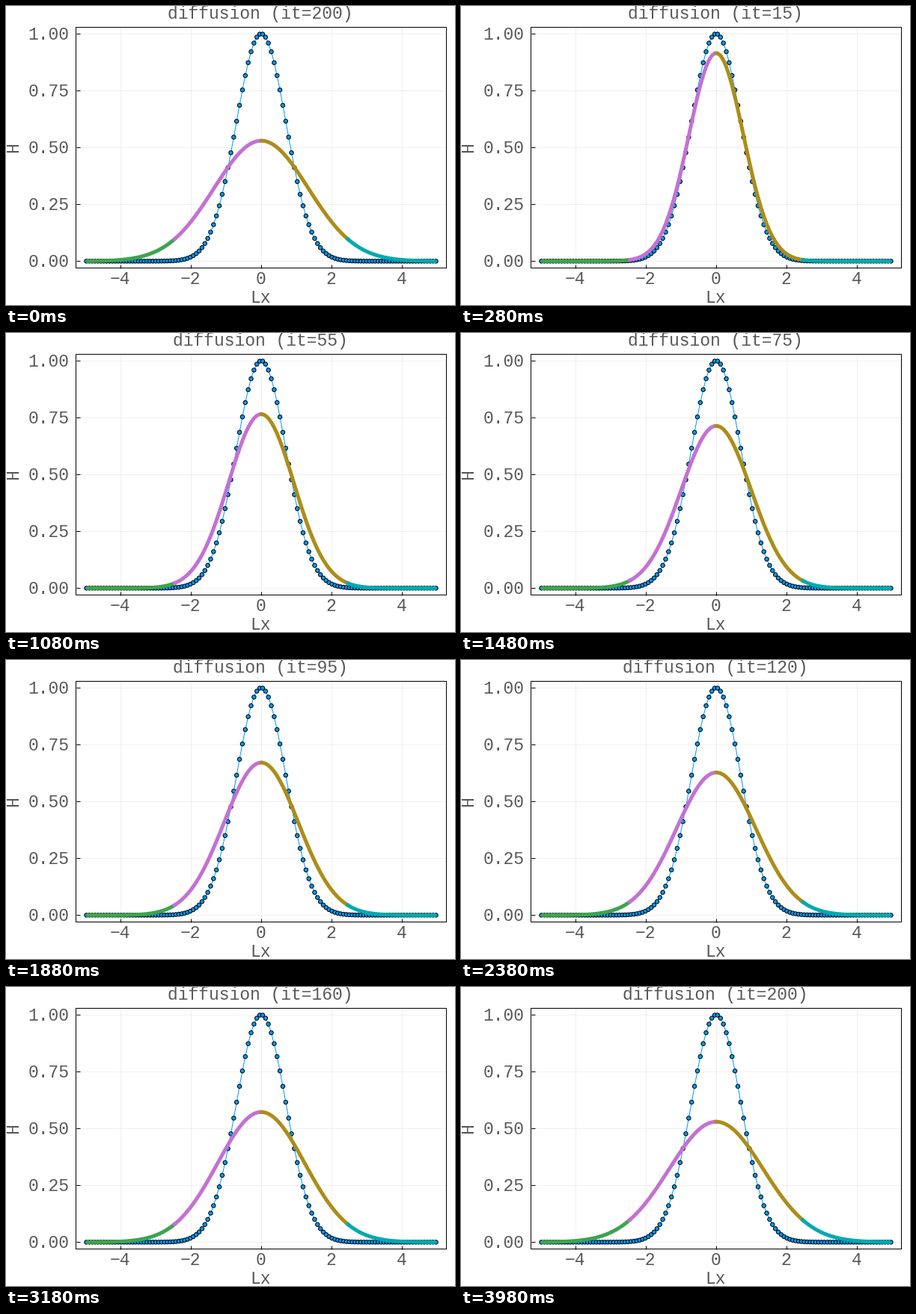
A matplotlib script that plays this animation: 600 by 400 pixels, repeating every 4 s.

```python
import numpy as np
import matplotlib.pyplot as plt
from matplotlib.animation import FuncAnimation

W, H, DPI = 600, 400, 100
PX = 72 / DPI  # points per pixel
LEFT, RIGHT, TOP, BOTTOM = 93.5, 588.5, 28.5, 350.5
INK = "#585858"
BLUE = "#009AFA"
COLORS = ["#3DA44D", "#C371D2", "#AC8D18", "#00AAAE"]

# Four overlapping subdomains on one global grid
LX, LAM, NT, NP, NX = 10.0, 1.0, 200, 4, 32
NXG = (NX - 2) * NP + 2
DX = LX / NXG
DT = DX**2 / LAM / 2.1
x = (np.arange(NXG) + 0.5) * DX - LX / 2
initial = np.exp(-x**2)


def solve():
    states = [initial]
    for _ in range(NT):
        u = states[-1].copy()
        u[1:-1] += DT * LAM * np.diff(u, 2) / DX**2
        states.append(u)
    return states


def padded(values):
    pad = 0.03 * (values.max() - values.min())
    return values.min() - pad, values.max() + pad


def label(px, py, s, **kw):
    """Place text at pixel coordinates measured from the top left."""
    style = dict(family="Liberation Mono", size=23 * PX, color=INK,
                 ha="center", va="baseline", rotation_mode="anchor")
    return fig.text(px / W, 1 - py / H, s, **{**style, **kw})


states = solve()
x0, x1 = padded(x)
y0, y1 = padded(initial)

fig = plt.figure(figsize=(W / DPI, H / DPI), dpi=DPI, facecolor="white")
ax = fig.add_axes([LEFT / W, 1 - BOTTOM / H,
                   (RIGHT - LEFT) / W, (BOTTOM - TOP) / H])
ax.set_xlim(x0, x1)
ax.set_ylim(y0, y1)
ax.set_xticks([-4, -2, 0, 2, 4])
ax.set_yticks([0, 0.25, 0.5, 0.75, 1])
ax.tick_params(direction="in", length=5 * PX, width=PX,
               labelbottom=False, labelleft=False)
ax.set_axisbelow(True)
ax.grid(color="black", alpha=0.06, linewidth=PX)
for spine in ax.spines.values():
    spine.set_linewidth(PX)
    spine.set_snap(False)

for tick in ax.get_xticks():
    px = LEFT + (tick - x0) / (x1 - x0) * (RIGHT - LEFT)
    label(px - 0.5, 371.5, f"{tick:.0f}".replace("-", "\u2212"))
for tick in ax.get_yticks():
    py = BOTTOM - (tick - y0) / (y1 - y0) * (BOTTOM - TOP)
    label(84.3, py + 7.5, f"{tick:.2f}", ha="right")
label(340.5, 397, "Lx")
label(16.5, 189.5, "H", rotation=90)
title = label(340, 17, "")

ax.plot(x, initial, color=BLUE, linewidth=PX, zorder=3)
# One face colour per point keeps the markers at subpixel positions
ax.scatter(x, initial, s=(5.4 * PX)**2, facecolors=[BLUE] * NXG,
           edgecolors="black", linewidths=PX, zorder=3.5)
parts = [slice(k * (NX - 2), k * (NX - 2) + NX) for k in range(NP)]
lines = [ax.plot([], [], color=c, linewidth=5 * PX, zorder=4,
                 solid_capstyle="butt", solid_joinstyle="round")[0]
         for c in COLORS]


def update(i):
    it = 5 * ((i + 1) // 5) or NT  # the last state is held across the loop
    title.set_text(f"diffusion (it={it})")
    for line, part in zip(lines, parts):
        line.set_data(x[part], states[it][part])
    return [title, *lines]


anim = FuncAnimation(fig, update, frames=200, interval=20,
                     repeat=True, repeat_delay=0)
plt.show()
```
